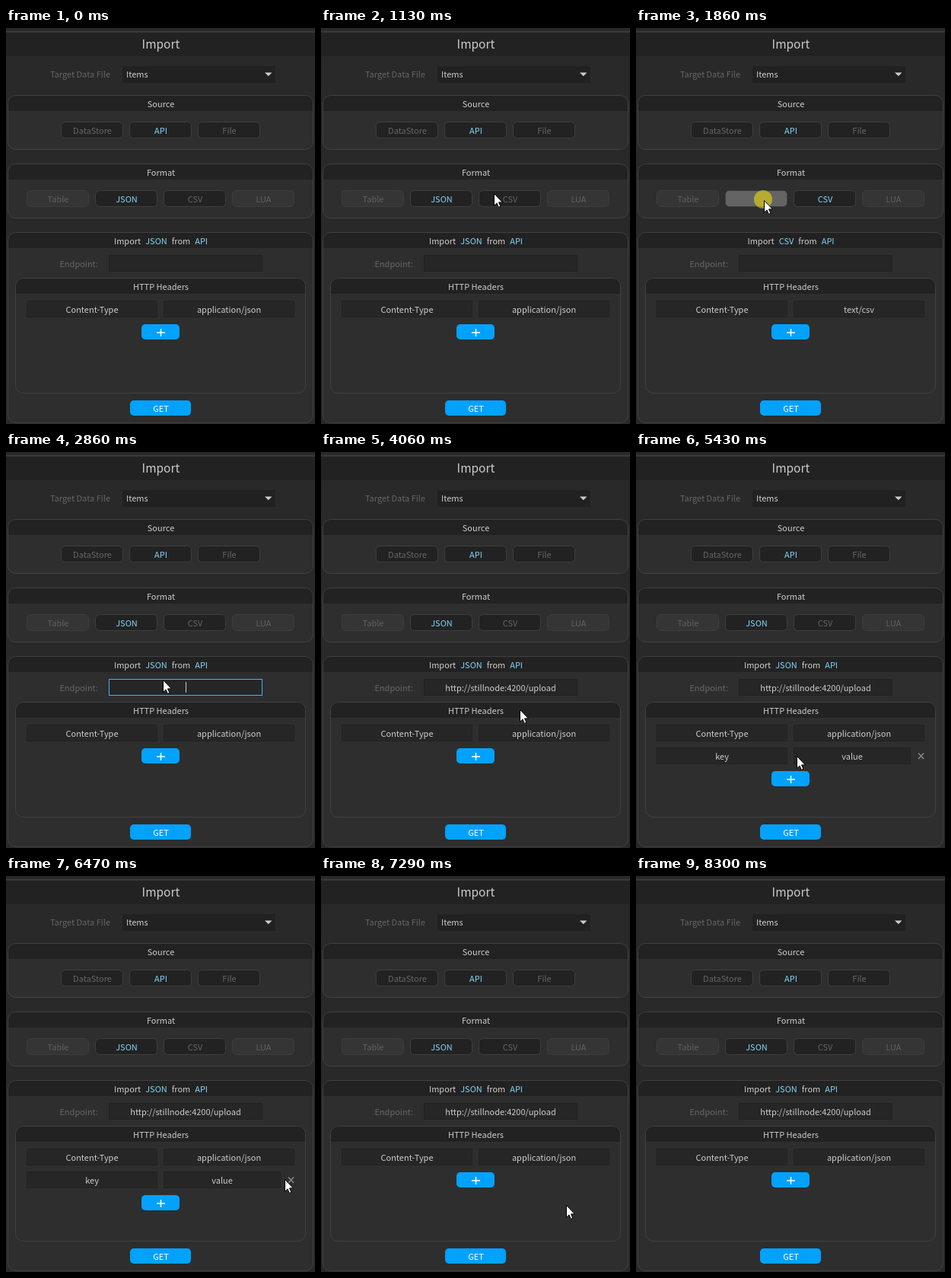
An HTML page that plays this animation: 406x520 px, repeating every 9.54 s.

```html
<!DOCTYPE html>
<html lang="en">
<head>
<meta charset="utf-8">
<title>Import panel</title>
<style>
  html, body { margin: 0; width: 100%; height: 100%; overflow: hidden; background: #292929; }
  svg { display: block; }
  text {
    font: 11px "Noto Sans CJK JP", "Noto Sans CJK SC", "Noto Sans CJK KR", "Noto Sans CJK", "Source Sans Pro", "Open Sans", sans-serif;
    white-space: pre;
  }
  .title { font-size: 15.5px; }
  .spaced { word-spacing: .5px; }
</style>
</head>
<body>
<svg id="stage" width="406" height="520" viewBox="0 0 406 520"></svg>
<script>
const LOOP = 9540;
const MID = 203.5, ROW = 30, STEP = 90;
const BRIGHT = '#cccccc', DIM = '#666666', CYAN = '#80d8f8';
const DARK = '#222222', PRESSED = '#646464', BLUE = '#00a2ff', BLUE_PRESSED = '#4dbeff';
const URL_TEXT = 'http://stillnode:4200/upload';
const stage = document.getElementById('stage');

function set(el, attrs) {
  for (const key in attrs) el.setAttribute(key, attrs[key]);
}
function add(tag, attrs, parent = stage) {
  const el = document.createElementNS('http://www.w3.org/2000/svg', tag);
  set(el, attrs);
  parent.appendChild(el);
  return el;
}
function show(el, visible) {
  el.setAttribute('visibility', visible ? 'visible' : 'hidden');
}
function setText(el, value) {
  if (el.textContent !== value) el.textContent = value;
}
function label(value, x, y, fill = BRIGHT, anchor = 'middle', parent = stage) {
  const el = add('text', { x, y, fill, 'text-anchor': anchor }, parent);
  el.textContent = value;
  return el;
}
function rect(x, y, width, height, fill, parent = stage) {
  return add('rect', { x, y, width, height, fill }, parent);
}
// Rectangle with a crisp one-pixel border inside the given bounds
function bordered(x, y, w, h, rx, fill, stroke, parent = stage) {
  return add('rect', { x: x + .5, y: y + .5, width: w - 1, height: h - 1, rx, fill, stroke }, parent);
}

// Rounded box with a dark header strip
function panel(x, y, w, h, caption) {
  const r = 10;
  bordered(x, y, w, h, r, '#2e2e2e', 'none');
  add('path', {
    d: `M${x} ${y + 21}v${r - 21}a${r} ${r} 0 0 1 ${r} ${-r}h${w - 2 * r}a${r} ${r} 0 0 1 ${r} ${r}v${21 - r}z`,
    fill: DARK
  });
  bordered(x, y, w, h, r, 'none', '#414141');
  return label(caption, MID, y + 16);
}
function choice(x, y, caption, color = DIM, fill = DARK) {
  const box = bordered(x, y, 82, 22, 5, fill, '#3e3e3e');
  return { box, text: label(caption, x + 41.5, y + 16, color) };
}
function field(x, y, w, caption = '', parent = stage) {
  const box = bordered(x, y, w, 22, 0, '#262626', DARK, parent);
  return { box, text: label(caption, x + w / 2, y + 16, BRIGHT, 'middle', parent) };
}
function blueButton(x, y, width, parent = stage) {
  return add('rect', { x, y, width, height: 20, rx: 5, fill: BLUE }, parent);
}

rect(0, 4, 406, 2, '#3a3a3a');
rect(0, 6, 406, 31, DARK);
label('Import', MID, 27).setAttribute('class', 'title');
label('Target Data File', 137, 65, DIM, 'end');
rect(153, 50, 201, 22, '#212121');
label('Items', 158, 65, BRIGHT, 'start');
add('path', { d: 'M340 58.5h9.5l-4.75 4.75z', fill: BRIGHT });

panel(2, 88, 402, 72, 'Source');
['DataStore', 'API', 'File'].forEach((name, i) =>
  choice(72 + STEP * i, 123, name, name === 'API' ? CYAN : DIM));

panel(2, 178, 402, 72, 'Format');
const [, json, csv] = ['Table', 'JSON', 'CSV', 'LUA'].map((name, i) =>
  i % 3 ? choice(27 + STEP * i, 213, name) : choice(27 + STEP * i, 213, name, '#606060', '#353535'));

const heading = panel(2, 268, 402, 251, '');
heading.setAttribute('class', 'spaced');
const [, kind] = ['Import  ', 'JSON', '  from  ', 'API'].map((word, i) => {
  const span = add('tspan', { fill: i % 2 ? CYAN : BRIGHT }, heading);
  span.textContent = word;
  return span;
});

label('Endpoint:', 121, 314, DIM, 'end');
const endpoint = field(135, 298, 202);
const caret = rect(236, 302, 1, 14, BRIGHT);

panel(12, 328, 382, 152, 'HTTP Headers');
field(27, 358, 172, 'Content-Type');
const mime = field(207, 358, 172);

const extraRow = add('g', {});
field(27, 358 + ROW, 172, 'key', extraRow);
field(207, 358 + ROW, 154, 'value', extraRow);
add('path', { d: 'M371 395.5l7 7.5m0-7.5l-7 7.5', stroke: '#858585', 'stroke-width': 1.6 }, extraRow);

const plus = add('g', {});
const plusBox = blueButton(178, 389, 50, plus);
add('path', { d: 'M198 400h11m-5.5-5v10', stroke: '#ffffff', 'stroke-width': 1.4 }, plus);

const getBox = blueButton(163, 489, 80);
label('GET', MID, 504, '#ffffff');

const pulse = add('circle', { r: 12, fill: '#fff000', 'fill-opacity': .52 });
const pointer = add('path', {
  d: 'M.5 .5V16.3L4 12.9 6.4 18.4 8.9 17.3 6.5 11.9H11.4Z',
  fill: '#ffffff', stroke: '#000000', 'stroke-linejoin': 'round'
});

// Press and release times
const clicks = {
  csv: [1200, 1240], json: [1860, 1950], focus: [2700, 2800],
  add: [5260, 5430], remove: [6640, 6740], get: [7750, 7960]
};
const PASTE = 3480, CARET_OFF = 3850, BLUR = 4060;

// Resting places of the pointer: x, y, arrival, departure
const stops = [
  [262, 520, 290, 290],
  [227, 217, 1110, 1300],
  [168, 226, 1830, 1960],
  [190, 290, 2240, 2490],
  [206, 299, 2660, 2860],
  [261, 338, 3560, 4540],
  [211, 399, 5220, 5540],
  [75, 391, 5800, 5800],
  [366, 398, 6300, 6470],
  [384, 396, 6600, 6770],
  [322, 432, 7290, 7290],
  [213, 503, 7740, 8160],
  [197, 520, 8300, 8300]
];

const within = (t, from, to) => t >= from && t < to;
const ease = p => p * p * (3 - 2 * p);

function pointerAt(t) {
  const i = stops.findIndex(([, , arrive]) => arrive > t);
  if (i < 1) return null;
  const [x0, y0, , leave] = stops[i - 1], [x1, y1, arrive] = stops[i];
  const k = ease(Math.max(0, (t - leave) / (arrive - leave)));
  return { x: Math.round(x0 + (x1 - x0) * k), y: Math.round(y0 + (y1 - y0) * k) };
}

function draw(t) {
  const down = name => within(t, ...clicks[name]);
  const done = name => t >= clicks[name][1];

  const isCsv = done('csv') && !done('json');
  set(json.text, { fill: isCsv ? DIM : CYAN });
  set(csv.text, { fill: isCsv ? CYAN : DIM });
  set(json.box, { fill: down('json') ? PRESSED : DARK });
  set(csv.box, { fill: down('csv') ? PRESSED : DARK });
  setText(kind, isCsv ? 'CSV' : 'JSON');
  setText(mime.text, isCsv ? 'text/csv' : 'application/json');

  const pasted = t >= PASTE;
  set(endpoint.box, { stroke: within(t, clicks.focus[0], BLUR) ? '#35b5ff' : DARK });
  setText(endpoint.text, pasted ? URL_TEXT : '');
  show(caret, within(t, clicks.focus[0], CARET_OFF));
  set(caret, { x: pasted ? 309 : 236 });

  const hasRow = done('add') && !done('remove');
  show(extraRow, hasRow);
  set(plus, { transform: `translate(0 ${hasRow ? ROW : 0})` });
  set(plusBox, { fill: down('add') ? BLUE_PRESSED : BLUE });
  set(getBox, { fill: down('get') ? BLUE_PRESSED : BLUE });

  const at = pointerAt(t);
  show(pointer, at);
  show(pulse, at && Object.keys(clicks).some(down));
  if (at) {
    set(pointer, { transform: `translate(${at.x} ${at.y})` });
    set(pulse, { cx: at.x - 1, cy: at.y - 1 });
  }
}

const start = performance.now();
function tick() {
  draw((performance.now() - start) % LOOP);
  requestAnimationFrame(tick);
}
tick();
</script>
</body>
</html>
```
